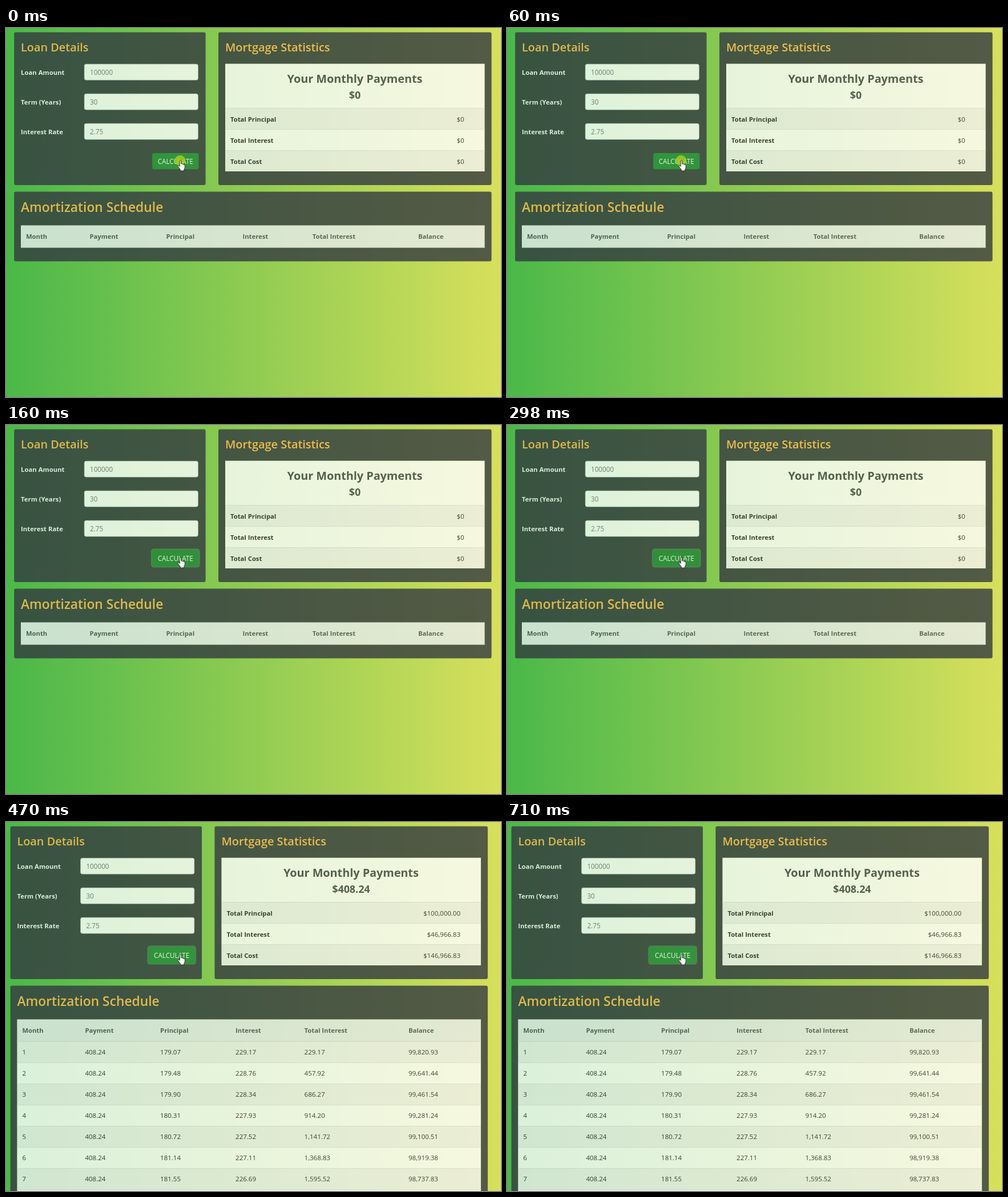
An HTML page that plays this animation: 867x646 px, repeating every 870 ms.

```html
<!DOCTYPE html>
<html lang="en">
<head>
<meta charset="utf-8">
<title>Loan calculator</title>
<style>
  html, body { margin: 0; width: 100%; height: 100%; overflow: hidden; }
  svg { display: block; width: 867px; height: 646px; }
  text { font-family: "Open Sans", "Noto Sans", sans-serif; font-size: 11.5px; fill: #212529; white-space: pre; }
  .h2, .h3 { font-weight: 600; fill: #ffb84c; }
  .h2 { font-size: 22.8px; }
  .h3 { font-size: 19.9px; }
  .label { font-weight: 700; font-size: 11.35px; fill: #f8f9fa; }
  .field { font-size: 11.7px; fill: #6c757d; }
  .button { font-size: 11.7px; fill: #fff; }
  .th { font-weight: 700; font-size: 11.25px; }
  .head { fill: #495057; }
  .big { font-weight: 700; font-size: 19.8px; fill: #3f464d; }
  .sum { font-weight: 700; font-size: 17.9px; fill: #3f464d; }
</style>
</head>
<body>
<svg viewBox="0 0 867 646">
  <defs>
    <linearGradient id="meadow">
      <stop stop-color="#4ab849"/>
      <stop offset="1" stop-color="#d7e05c"/>
    </linearGradient>
  </defs>
  <rect width="867" height="646" fill="url(#meadow)"/>
  <g id="page"></g>
  <circle id="click" cx="304.8" cy="232" r="9.3" fill="#a8d01c"/>
  <path transform="translate(300.3 231)" fill="#fff" stroke="#222" stroke-width=".9" stroke-linejoin="round"
    d="M4 2Q4 .5 5.2 .5Q6.5 .5 6.5 2V7Q9 6.3 9 7.6Q11 7 11.2 8.4Q13 8 13 9.6V13Q13 15 11.5 16.5V19H5V17L1 11.6Q0 9.8 1.6 9.6Q3 9.8 4 11.4Z"/>
</svg>
<script>
const LOOP = 870, STEPS = [0, 100, 160, 390, 470];
const SCROLLBAR_SHIFT = -6.6;
const PRINCIPAL = 100000, YEARS = 30, RATE = 2.75;
const page = document.getElementById('page');
const click = document.getElementById('click');

const money = n => n.toLocaleString('en-US', { minimumFractionDigits: 2, maximumFractionDigits: 2 });
const rect = (x, y, w, h, fill, more = '') =>
  `<rect x="${x}" y="${y}" width="${w}" height="${h}" fill="${fill}" ${more}/>`;
const text = (x, y, str, cls = '', anchor = 'start') =>
  `<text x="${x}" y="${y}" class="${cls}" text-anchor="${anchor}">${str}</text>`;
const panel = (x, y, w, h, body) =>
  `<g opacity=".8">${rect(x, y, w, h, '#343a40', 'rx="3"')}${body}</g>`;
const row = (x, y, w, striped) =>
  rect(x, y, w, 37, striped ? '#f2f2f2' : '#fff') + rect(x, y, w, 1, '#dee2e6');

const monthlyRate = RATE / 1200;
const months = YEARS * 12;
const payment = PRINCIPAL * monthlyRate / (1 - (1 + monthlyRate) ** -months);

function loanDetails(step) {
  const fields = [['Loan Amount', PRINCIPAL], ['Term (Years)', YEARS], ['Interest Rate', RATE]];
  const focused = step > 1;
  const fill = ['#218838', '#218838', '#1f8336', '#20873a', '#218838'][step];
  return panel(14.2, 7.6, 335.4, 267.4,
    text(26, 40.6, 'Loan Details', 'h3') +
    fields.map(([name, value], i) => {
      const y = 63 + 52 * i;
      return text(26, y + 18.5, name, 'label') +
        rect(137.3, y + .3, 199, 27.8, '#fff', 'rx="3" stroke="#ced4da" stroke-width=".8"') +
        text(147, y + 19.1, value, 'field');
    }).join('') +
    (focused ? rect(253.9, 216.6, 85.8, 33, '#48b461', 'rx="5" opacity=".5"') : '') +
    rect(256.2, 218.9, 81.2, 28.4, fill, 'rx="3"') +
    text(296.7, 237.6, 'CALCULATE', 'button', 'middle'));
}

function statistics(done) {
  const interest = payment * months - PRINCIPAL;
  const totals = [['Principal', PRINCIPAL], ['Interest', interest], ['Cost', PRINCIPAL + interest]];
  const dollars = n => done ? '$' + money(n) : '$0';
  return panel(372, 7.6, 478.4, 267.4,
    text(384, 40.6, 'Mortgage Statistics', 'h3') +
    rect(384, 62.6, 454.4, 78, '#fff') +
    text(611, 96.4, 'Your Monthly Payments', 'big', 'middle') +
    text(611, 124.4, dollars(payment), 'sum', 'middle') +
    totals.map(([name, value], i) => {
      const y = 140 + 37 * i;
      return row(384, y, 454.4, i % 2 === 0) +
        text(393, y + 23.6, 'Total ' + name, 'th') +
        text(802.6, y + 23.6, dollars(value), '', 'end');
    }).join(''));
}

function schedule(done) {
  const names = ['Month', 'Payment', 'Principal', 'Interest', 'Total Interest', 'Balance'];
  const columns = done ? [35, 145, 276.7, 408.7, 529.2, 711.5] : [35, 146.5, 280.5, 414.5, 536.7, 722];
  const cells = (values, y, cls) => values.map((v, i) => text(columns[i], y, v, cls)).join('');
  let body = text(26, 322.2, 'Amortization Schedule', 'h2') +
    rect(26, 345.5, 812.4, 39, '#e9ecef') + rect(26, 383, 812.4, 1.5, '#dee2e6') +
    cells(names, 369, 'th head');
  let balance = PRINCIPAL, paid = 0;
  for (let month = 1; done && month <= 8; month++) {
    const interest = balance * monthlyRate;
    const y = 384 + 37 * (month - 1);
    paid += interest;
    balance -= payment - interest;
    body += row(26, y, 812.4, month % 2) +
      cells([month, ...[payment, payment - interest, interest, paid, balance].map(money)], y + 23.2);
  }
  return panel(14.2, 286.6, 836.2, done ? 400 : 121.8, body);
}

let shown = -1;
function draw() {
  const t = performance.now() % LOOP;
  const step = STEPS.findLastIndex(start => t >= start);
  if (step !== shown) {
    shown = step;
    const done = step > 2;
    page.setAttribute('transform', `translate(${done ? SCROLLBAR_SHIFT : 0})`);
    page.innerHTML = loanDetails(step) + statistics(done) + schedule(done);
    click.setAttribute('opacity', [.8, .92, 0, 0, 0][step]);
  }
  requestAnimationFrame(draw);
}
draw();
</script>
</body>
</html>
```
